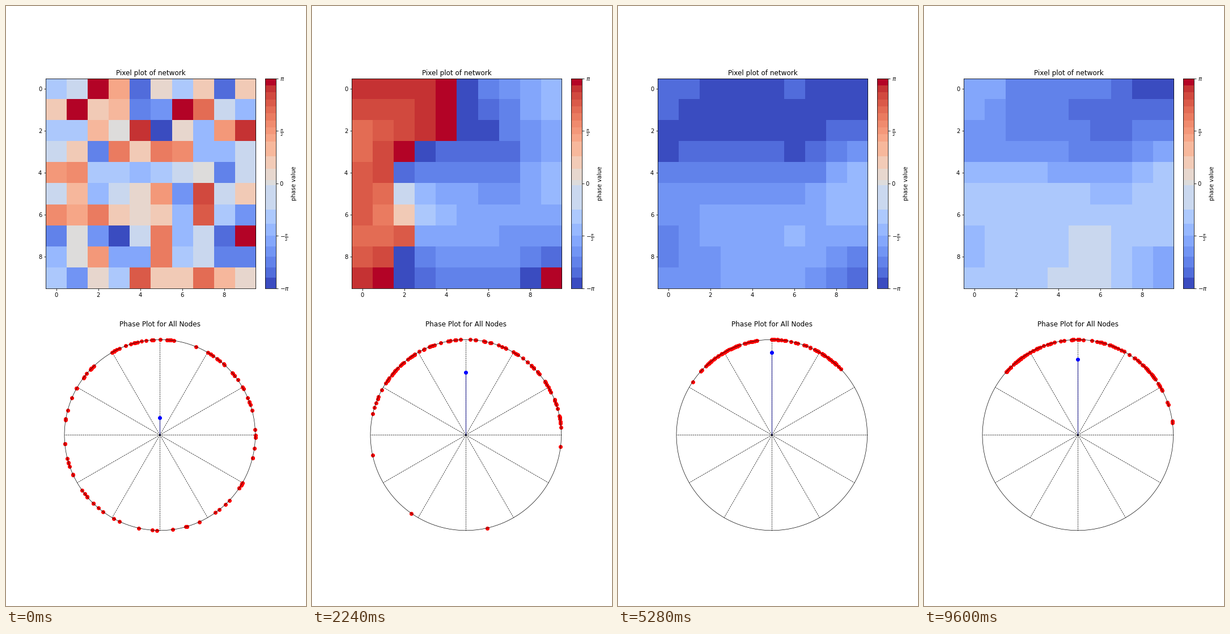
These frames come from a looping animation (529 by 1058 pixels, 9.76 s). A matplotlib script:

```python
import numpy as np
import matplotlib.pyplot as plt
from matplotlib.animation import FuncAnimation
from matplotlib.colors import BoundaryNorm, ListedColormap

W, H, DPI = 529, 1058, 72
N, FRAMES, STEP = 10, 61, 160
TURN = 2 * np.pi
MIXED, ORDERED, QUIET, END = 640, 2240, 4000, 9600  # ms

# Phases are counted in percent of a turn, 0 standing for -pi.
v, u = np.mgrid[0:1:N * 1j, 0:1:N * 1j]
cells = (u + 1j * v) * (N - 1)


def bump(x, y, height, width):
    return height * np.exp(-((u - x) ** 2 + (v - y) ** 2) / width ** 2)


def smoothstep(x):
    x = np.clip(x, 0, 1)
    return x * x * (3 - 2 * x)


start = np.random.default_rng(4).normal(53, 28, (N, N))
slope = 7 - 11 * v - 31 * u * v
final = (11 + 24 * smoothstep((v - 0.12) / 0.56)
         + bump(0, 0, 13, 0.2) + bump(0.95, 0, -10, 0.15)
         + bump(0.72, 0.36, -7, 0.22) + bump(1, 0.45, 8, 0.15)
         + bump(0, 0.85, -8, 0.12) + bump(1, 1, -15, 0.2)
         + bump(0.65, 0.95, 4, 0.3))
drift = (1 - v) * 14.5 * (1 - u) + v * (17 - 4 * u)
corner = bump(1, 0, 22, 0.3)

# Vortex pairs that close up: centre, half distance, lifetime in ms
PAIRS = [(2.1 + 5.8j, -0.4 - 1.6j, 2700),
         (2.5 + 2.5j, 1, 1300),
         (3.5 + 5j, 0.5j, 1000),
         (4.5 - 0.5j, -2j, 1500),
         (7.5 - 0.5j, -2j, 1500)]


def swirl(t):
    total = 0
    for mid, half, life in PAIRS:
        gap = half * np.sqrt(max(0, 1 - (t - MIXED) / life))
        total = total + np.angle((cells - mid - gap) / (cells - mid + gap))
    return total / TURN * 100


def settled(t):
    lag = np.interp(t, [ORDERED, QUIET, 5280, 7680, END],
                    [1.9, 1.5, 1, 0.38, 0])
    return final - lag * drift + corner * np.interp(t, [ORDERED, QUIET], [1, 0])


def flow(t):
    s = np.interp(t, [MIXED, ORDERED], [0, 1])
    return slope + (settled(t) - slope) * s + swirl(t)


def phases(t):
    """Phases of all nodes in radians, from -pi to pi."""
    if t < MIXED:
        gap = (flow(MIXED) - start + 50) % 100 - 50
        p = start + gap * t / MIXED
    else:
        p = flow(t)
    return (p % 100) / 100 * TURN - np.pi


# Stepped colour scale, coarser around zero
edges = np.concatenate([np.arange(0, 30, 5), [30.7, 37.4, 49, 51.5, 57, 63],
                        np.linspace(70, 100, 10)])
mids = (edges[:-1] + edges[1:]) / 200
mids[0], mids[-1] = 0, 1
edges = edges / 100 * TURN - np.pi
cmap = ListedColormap(plt.get_cmap("coolwarm")(mids))
norm = BoundaryNorm(edges, cmap.N)

plt.rcParams["font.family"] = "DejaVu Sans"
fig = plt.figure(figsize=((W + 0.001) / DPI, (H + 0.001) / DPI), dpi=DPI,
                 facecolor="white")


def panel(x, y, w, h):
    return fig.add_axes([x / W, 1 - (y + h) / H, w / W, h / H])


ax = panel(70.2, 127.6, 370.2, 370.2)
ax.set_title("Pixel plot of network")
grid = ax.imshow(phases(0), cmap=cmap, norm=norm, interpolation="nearest")
ax.set_xticks(range(0, N, 2))
ax.set_yticks(range(0, N, 2))

bar = panel(457.2, 127.6, 18.6, 370.2)
bar.pcolormesh([0, 1], edges, (edges[:-1, None] + edges[1:, None]) / 2,
               cmap=cmap, norm=norm)
bar.set_xticks([])
bar.yaxis.tick_right()
bar.yaxis.set_label_position("right")
bar.set_yticks(np.linspace(-np.pi, np.pi, 5),
               [r"$-\pi$", r"$-\frac{\pi}{2}$", "0",
                r"$\frac{\pi}{2}$", r"$\pi$"])
bar.set_ylabel("phase value")

ring = panel(86.2, 571.4, 370.2, 370.2)
ring.set_title("Phase Plot for All Nodes")
ring.set(xlim=(-1.1, 1.1), ylim=(-1.1, 1.1))
ring.axis("off")
for k in range(12):
    a = k * np.pi / 6
    ring.plot([0, np.cos(a)], [0, np.sin(a)], "k--", lw=0.7)
ring.add_patch(plt.Circle((0, 0), 1, fill=False, ec="black", lw=0.7, zorder=4))
dots, = ring.plot([], [], "o", color="red", ms=6, zorder=3)
stem, = ring.plot([], [], color="#000080", lw=0.9, zorder=5)
tip, = ring.plot([], [], "o", color="blue", ms=6, zorder=6)


def draw(i):
    p = phases(i * STEP)
    z = np.exp(1j * p.ravel())
    mean = z.mean()
    r = abs(mean)
    z *= 1j * r / mean  # the mean phase points up
    grid.set_data(p)
    dots.set_data(z.real, z.imag)
    stem.set_data([0, 0], [0, r])
    tip.set_data([0], [r])
    return grid, dots, stem, tip


anim = FuncAnimation(fig, draw, frames=FRAMES, interval=STEP, repeat=True,
                     repeat_delay=0)
plt.show()
```
